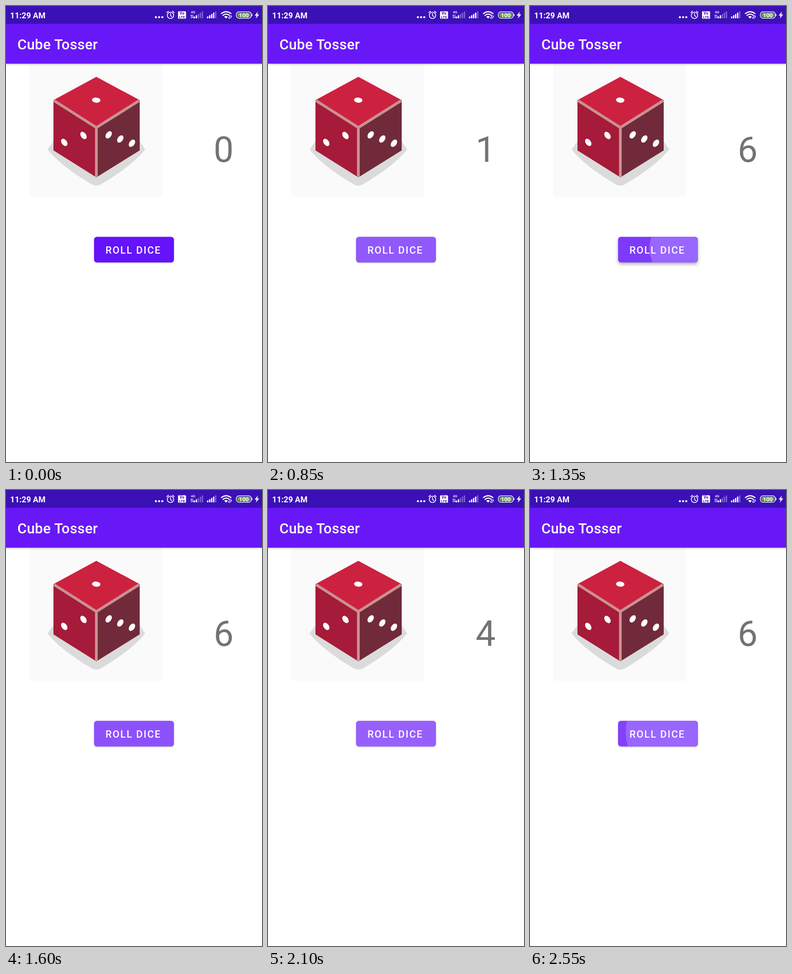
Recreate the animation shown at these times as an HTML page. Size 561 by 998 pixels, loop 2600 ms.

```html
<!DOCTYPE html>
<html lang="en">
<head>
<meta charset="utf-8">
<title>Cube Tosser</title>
<style>
  html, body { margin: 0; width: 100%; height: 100%; overflow: hidden; background: #fff; }
  svg { display: block; width: 561px; height: 998px; font-family: Roboto, sans-serif; }
  .bar { filter: drop-shadow(0 1.5px 2px rgba(0, 0, 0, .3)); }
  .line { fill: none; stroke: #fff; stroke-linecap: round; }
</style>
</head>
<body>
<svg viewBox="0 0 561 998">
  <defs>
    <clipPath id="buttonClip"><rect x="193" y="505.2" width="175" height="56.1" rx="6.2"/></clipPath>
  </defs>

  <!-- Die -->
  <rect x="51" y="120" width="291.5" height="297.5" fill="#fafafa"/>
  <path d="M91 314Q120 350 184 388Q198 398 212 388Q276 350 305 314L293 296H104Z" fill="#dbdbdb"/>
  <path d="M104 206L198 266V375L104 316Z" fill="#a51b39"/>
  <path d="M293 206L198 266V375L293 316Z" fill="#712a3a"/>
  <path d="M198 155L293 206L198 266L104 206Z" fill="#cd2140"/>
  <path d="M105 207L198 266L292 207M198 266V374" fill="none" stroke="#c99191" stroke-width="6"/>
  <g id="pips" fill="#fff"></g>

  <!-- App bar -->
  <rect class="bar" y="30" width="561" height="96.2" fill="#6818f7"/>
  <rect width="561" height="39" fill="#3b10b7"/>
  <text x="24.9" y="95" font-size="31.2" font-weight="500" letter-spacing=".39" fill="#fff">Cube Tosser</text>

  <!-- Status bar -->
  <g fill="#fff">
    <text x="9" y="26.5" font-size="17.7" font-weight="700">11:29 AM</text>
    <circle cx="328.5" cy="24.5" r="2.3"/>
    <circle cx="335.5" cy="24.5" r="2.3"/>
    <circle cx="342.5" cy="24.5" r="2.3"/>
    <g class="line" stroke-width="1.7">
      <circle cx="360.5" cy="20.5" r="7"/>
      <path d="M360.5 16V21L363.5 23M352.5 14.5L356 11.5M368.5 14.5L365 11.5"/>
    </g>
    <rect x="377" y="11.5" width="17.5" height="16.5" rx="2"/>
    <g fill="#3b10b7" font-weight="700" text-anchor="middle">
      <text x="385.7" y="19.3" font-size="8.5">Vo</text>
      <text x="385.7" y="27" font-size="8">LTE</text>
    </g>
    <text x="405" y="16" font-size="8" font-weight="500">4G</text>
    <path d="M404 21L406 18.5L408 21H406.7V27H405.3V21ZM407.5 24.5H408.8V19H410.2V24.5H411.5L409.5 27Z" opacity=".85"/>
    <g id="signal"></g>
    <path class="line" stroke-width="2.4" d="M472 16.5Q482.5 8.5 493 16.5M475.5 20.5Q482.5 15 489.5 20.5"/>
    <path d="M478 23.5Q482.5 20 486 23.5L482.5 27.5Z"/>
    <path class="line" stroke-width="1.3" d="M488 25L492 21.5Q495 21 494 24L490.5 27Q487 28 488 25"/>
    <rect x="504.7" y="12.7" width="33" height="14" rx="6" fill="none" stroke="#fff" stroke-width="1.5"/>
    <rect x="507" y="15" width="28.5" height="9.5" rx="4" fill="#63a83b"/>
    <text x="521.3" y="24.5" font-size="12.5" font-weight="700" text-anchor="middle">100</text>
    <rect x="538.3" y="17.5" width="1.6" height="4.5"/>
    <path d="M552 12L545 21H549L547.5 27.5L555 18.5H550.5Z"/>
  </g>

  <text id="value" x="477" y="341.3" font-size="77.9" text-anchor="middle" fill="#737373">0</text>

  <!-- Button -->
  <rect id="button" x="193" y="505.2" width="175" height="56.1" rx="6.2" fill="#6413fa"/>
  <g clip-path="url(#buttonClip)">
    <rect id="glow" x="193" y="505" width="175" height="57" fill="#fff"/>
    <circle id="ripple" cy="530" fill="#9966ff"/>
  </g>
  <text x="217.9" y="541.8" font-size="21.8" font-weight="500" letter-spacing="1.95" fill="#fff">ROLL DICE</text>
</svg>

<script>
const $ = id => document.getElementById(id);
const LOOP = 2600, STEP = 50, SPREAD = 80, FADE = 883;
const taps = [
  { at: 640, value: 1 },
  { at: 1310, value: 6 },
  { at: 1640, value: 5 },
  { at: 1995, value: 4 },
  { at: 2480, value: 6 }
];

const pip = (x, y, angle, rx = 9, ry = 5.8) =>
  `<ellipse rx="${rx}" ry="${ry}" transform="translate(${x} ${y}) rotate(${angle})"/>`;
$('pips').innerHTML = pip(197.7, 206, 4, 9.2, 5.6) +
  pip(127.7, 298.5, 55) + pip(169.8, 283.3, 55) +
  pip(225, 282, -55) + pip(250.5, 291, -55) + pip(276, 300.3, -55);

const signalBars = (x, lit) => Array.from({ length: 5 }, (_, i) => {
  const h = 4 + i * 2.8;
  return `<rect x="${x + i * 4.4}" y="${27 - h}" width="2.8" height="${h}" rx=".6" opacity="${i < lit ? 1 : .35}"/>`;
}).join('');
$('signal').innerHTML = signalBars(411.5, 2) + signalBars(440.5, 4);

// Strength of the white highlight left by a tap
const highlight = (tap, t) =>
  tap ? .335 * Math.exp(-Math.max(0, t - tap.at - SPREAD) / FADE) : 0;

function draw(t) {
  const index = taps.filter(tap => tap.at <= t).length - 1;
  const tap = taps[index];
  const spread = tap ? (t - tap.at) / SPREAD : 1;
  const spreading = spread < 1;

  $('value').textContent = tap ? tap.value : 0;
  $('glow').setAttribute('opacity', highlight(spreading ? taps[index - 1] : tap, t));
  $('ripple').setAttribute('r', spreading ? 24 + 85 * spread : 0);
  $('ripple').setAttribute('cx', 354.5 - 53 * spread);

  const raised = taps.some(({ at }) => t > at - 30 && t < at + 55);
  $('button').style.filter = raised
    ? 'drop-shadow(0 4px 3.5px rgba(0,0,0,.3))'
    : 'drop-shadow(0 1.5px 1.5px rgba(0,0,0,.28))';
}

const start = performance.now();
function tick() {
  const t = (performance.now() - start) % LOOP;
  draw(Math.floor(t / STEP) * STEP);
  requestAnimationFrame(tick);
}
tick();
</script>
</body>
</html>
```
